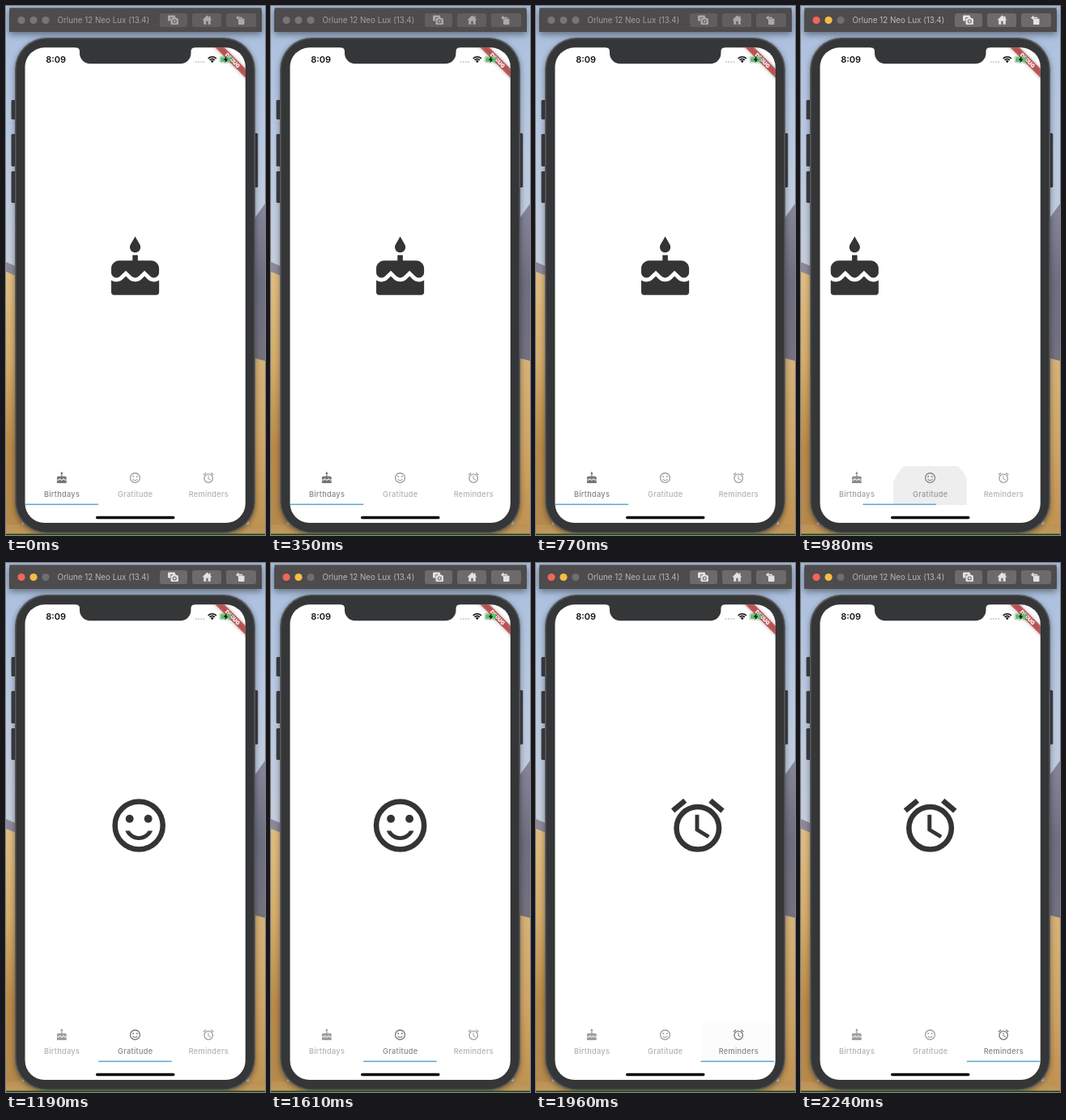
Recreate the animation shown at these times as an HTML page with a canvas. Size 320 by 653 pixels, loop 2.52 s.

```html
<!DOCTYPE html>
<html lang="en">
<head>
<meta charset="utf-8">
<title>Tab bar demo</title>
<style>
  html, body { margin: 0; width: 100%; height: 100%; overflow: hidden; background: #b9c6da; }
  canvas { display: block; width: 320px; height: 653px; }
</style>
</head>
<body>
<canvas id="stage"></canvas>
<script>
const W = 320, H = 653, LOOP = 2520, STEP = 70;
const PAGE = 272, TAB = PAGE / 3, LEFT = 23.5;
const PAGE_MS = 344, BAR_MS = 225;
const ACTIVE_AT = 840;
const TAPS = [{ at: 904, tab: 1 }, { at: 1769, tab: 2 }];
const LABELS = ['Birthdays', 'Gratitude', 'Reminders'];
const SANS = 'Inter, "Liberation Sans", sans-serif';

const canvas = document.getElementById('stage');
const ctx = canvas.getContext('2d');
const dpr = window.devicePixelRatio || 1;
canvas.width = W * dpr;
canvas.height = H * dpr;

// Icons live in a 24 x 24 box.
const cake = new Path2D('M12 6c1.11 0 2-.9 2-2 0-.38-.1-.73-.29-1.03L12 0l-1.71 2.97c-.19.3-.29.65-.29 1.03 0 1.1.9 2 2 2z' +
  'm4.6 9.99l-1.07-1.07-1.08 1.07c-1.3 1.3-3.58 1.31-4.89 0l-1.07-1.07-1.09 1.07C6.75 16.64 5.88 17 4.96 17c-.73 0-1.4-.23-1.96-.61V21' +
  'c0 .55.45 1 1 1h16c.55 0 1-.45 1-1v-4.61c-.56.38-1.23.61-1.96.61-.92 0-1.79-.36-2.44-1.01z');
cake.addPath(new Path2D('M18 9h-5V7h-2v2H6c-1.66 0-3 1.34-3 3v1.54c0 1.08.88 1.96 1.96 1.96.52 0 1.02-.2 1.38-.57l2.14-2.13 2.13 2.13' +
  'c.74.74 2.03.74 2.77 0l2.14-2.13 2.13 2.13c.37.37.86.57 1.38.57 1.08 0 1.96-.88 1.96-1.96V12c.01-1.66-1.33-3-2.99-3z'));
const mouth = new Path2D('M12 16c-1.48 0-2.75-.81-3.45-2H6.88c.8 2.05 2.79 3.5 5.12 3.5s4.32-1.45 5.12-3.5h-1.67c-.7 1.19-1.97 2-3.45 2z');
const bells = new Path2D('M22 5.72l-4.6-3.86-1.29 1.53 4.6 3.86zM7.88 3.39L6.6 1.86 2 5.71l1.29 1.53z' +
  'M12.5 8H11v6l4.75 2.85.75-1.23-4-2.37z');

const clamp = v => Math.max(0, Math.min(1, v));
const bez = (u, a, b) => 3 * u * (1 - u) * (1 - u) * a + 3 * u * u * (1 - u) * b + u * u * u;

// cubic-bezier(.25, .1, .25, 1)
function ease(x) {
  if (x <= 0 || x >= 1) return clamp(x);
  let lo = 0, hi = 1;
  for (let i = 0; i < 24; i++) {
    const mid = (lo + hi) / 2;
    if (bez(mid, .25, .25) < x) lo = mid; else hi = mid;
  }
  return bez(lo, .1, 1);
}

const progress = (t, ms) => TAPS.reduce((sum, tap) => sum + ease((t - tap.at) / ms), 0);

function disc(x, y, r, color) {
  ctx.fillStyle = color;
  ctx.beginPath();
  ctx.arc(x, y, r, 0, 7);
  ctx.fill();
}

function box(x, y, w, h, r, color) {
  ctx.fillStyle = color;
  ctx.beginPath();
  ctx.roundRect(x, y, w, h, r);
  ctx.fill();
}

function poly(points, color) {
  ctx.fillStyle = color;
  ctx.beginPath();
  points.forEach(p => ctx.lineTo(p[0], p[1]));
  ctx.fill();
}

function text(str, x, y, font, color, align = 'left', spacing = 0) {
  ctx.font = font + ' ' + SANS;
  ctx.fillStyle = color;
  ctx.textAlign = align;
  ctx.letterSpacing = spacing + 'px';
  ctx.fillText(str, x, y);
  ctx.letterSpacing = '0px';
}

function fade(y0, y1, ...colors) {
  const g = ctx.createLinearGradient(0, y0, 0, y1);
  colors.forEach((c, i) => g.addColorStop(i / (colors.length - 1), c));
  return g;
}

function shadow(color, blur, dy = 0) {
  ctx.shadowColor = color;
  ctx.shadowBlur = blur * dpr;
  ctx.shadowOffsetY = dy * dpr;
}

function ring(x, y, r, color) {
  ctx.strokeStyle = color;
  ctx.lineWidth = 2;
  ctx.beginPath();
  ctx.arc(x, y, r, 0, 7);
  ctx.stroke();
}

function icon(kind, x, y, size, color) {
  ctx.save();
  ctx.translate(x - size / 2, y - size / 2);
  ctx.scale(size / 24, size / 24);
  ctx.fillStyle = color;
  if (kind === 0) ctx.fill(cake);
  if (kind === 1) {
    ctx.fill(mouth);
    disc(8.5, 9.5, 1.5, color);
    disc(15.5, 9.5, 1.5, color);
    ring(12, 12, 9, color);
  }
  if (kind === 2) {
    ctx.fill(bells);
    ring(12, 13, 8, color);
  }
  ctx.restore();
}

function backdrop() {
  ctx.fillStyle = fade(0, 330, '#a9bfdf', '#b9c9e1', '#c6cedc');
  ctx.fillRect(0, 0, W, H);
  poly([[0, 316], [14, 322], [14, 345], [0, 345]], '#8b8a99');
  poly([[0, 328], [20, 336], [20, H], [0, H]], fade(328, H, '#e0bd83', '#d5ad6b', '#b98a48', '#b5884d'));
  poly([[W, 244], [300, 272], [300, 450], [W, 450]], fade(244, 440, '#85869a', '#6d6e80', '#74717f'));
  poly([[300, 433], [W, 438], [W, H], [300, H]], fade(433, H, '#d6b278', '#cfa566', '#c0914f'));
  ctx.fillStyle = fade(628, H, '#b5884d', '#c29a5e');
  ctx.fillRect(0, 640, W, 13);
}

function titleBar(active) {
  shadow('rgba(0,0,0,.45)', 9, 3);
  box(4, 2, 312, 30, [4, 4, 0, 0], '#4d4b4c');
  shadow('transparent', 0);
  box(4, 2, 312, 1, 0, '#6b6a6c');

  const lights = active ? ['#f3655b', '#f5bd45', '#706e6f'] : Array(3).fill('#777576');
  lights.forEach((c, i) => disc(19 + i * 15, 17.5, 4.6, c));
  text('Orlune 12 Neo Lux (13.4)', 63.5, 21, '400 9.8px', active ? '#b9b7b8' : '#a19fa0');

  const face = active ? '#6c6a6b' : '#605e5f', ink = active ? '#e3e1e2' : '#aaa8a9';
  [[190, 34], [230, 36], [272, 37]].forEach(([x, w]) => box(x, 9, w, 17, 3, face));

  box(200, 11.5, 9, 7, 1, ink);
  box(203, 14, 10.5, 9, 1.5, face);
  box(203.5, 15, 9.5, 8, 1.5, ink);
  box(206, 13.8, 4, 2, .5, ink);
  disc(208.3, 19, 2.5, face);
  disc(208.3, 19, 1.4, ink);

  poly([[248.5, 11.5], [254.5, 17.3], [242.5, 17.3]], ink);
  box(244.2, 16.5, 8.6, 6.2, 0, ink);
  box(251, 12.5, 1.6, 3, 0, ink);
  box(247.3, 18.7, 2.4, 4, 0, face);

  box(287, 15.5, 7.5, 7.5, 1, ink);
  poly([[284, 14.5], [287.5, 11.5], [287.5, 17.5]], ink);
  box(287, 13.7, 5, 1.4, 0, ink);
}

function phone() {
  [[116, 24], [158, 40], [204, 39]].forEach(([y, h]) => box(6.5, y, 7, h, 1.5, '#3d3e43'));
  box(304, 157, 7.3, 67, 1.5, '#3d3e43');
  shadow('rgba(0,0,0,.4)', 7, 2);
  box(11, 39, 297, 612, 39, '#5a5b5d');
  shadow('transparent', 0);
  box(12.5, 40.5, 294, 609, 38, '#353637');
}

function screenPath() {
  ctx.beginPath();
  ctx.roundRect(LEFT, 51.3, 272.3, 586.8, 24);
}

function ripple(t) {
  for (const { at, tab } of TAPS) {
    const age = t - at;
    if (age < -60 || age > 220) continue;
    const alpha = .065 * clamp((age + 60) / 50) * clamp((220 - age) / 144);
    ctx.save();
    ctx.beginPath();
    ctx.rect(LEFT + tab * TAB, 568, TAB, 48);
    ctx.clip();
    disc(LEFT + (tab + .5) * TAB + 1, 604, 49 * (age + 66) / 142, `rgba(0,0,0,${alpha})`);
    ctx.restore();
  }
}

function tabs(t) {
  const p = progress(t, BAR_MS);
  ripple(t);
  LABELS.forEach((label, i) => {
    const on = clamp(1 - Math.abs(p - i));
    const x = LEFT + (i + .5) * TAB;
    const iconTone = 158 - 40 * on, tone = 177 - 45 * on;
    icon(i, x, 582.4, 15.8, `rgb(${iconTone},${iconTone},${iconTone})`);
    text(label, x + .2, 605.5, '500 9.2px', `rgb(${tone},${tone},${tone})`, 'center', .28);
  });
  box(LEFT + p * TAB, 614.6, TAB, 1.4, 0, '#62a9cd');
}

function banner() {
  ctx.save();
  ctx.translate(295.8, 51.3);
  ctx.rotate(Math.PI / 4);
  shadow('rgba(0,0,0,.5)', 4);
  box(-40, 18.4, 80, 7.9, 0, 'rgba(183,28,28,.63)');
  shadow('transparent', 0);
  text('DEBUG', 0, 24.8, '900 6.6px', '#fff', 'center');
  ctx.restore();
}

function statusBar() {
  text('8:09', 49.3, 70, '600 11px', '#111');
  for (let i = 0; i < 4; i++) disc(234.8 + i * 3.2, 69, 1, '#c4c4c4');

  ctx.strokeStyle = '#111';
  ctx.lineWidth = 1.6;
  for (const r of [4.6, 7.2]) {
    ctx.beginPath();
    ctx.arc(254.8, 70, r, -Math.PI * .75, -Math.PI * .25);
    ctx.stroke();
  }
  poly([[254.8, 70.2], [252.7, 67.8], [254.8, 66.9], [256.9, 67.8]], '#111');

  ctx.strokeStyle = 'rgba(0,0,0,.35)';
  ctx.lineWidth = .7;
  ctx.beginPath();
  ctx.roundRect(263.8, 62.2, 15.4, 7.8, 2.2);
  ctx.stroke();
  box(265, 63.3, 13, 5.6, 1.2, '#58c46a');
  box(279.9, 64.8, 1, 2.6, .5, 'rgba(0,0,0,.35)');
  poly([[272.8, 61.8], [268.8, 66.8], [271.2, 66.8], [270.4, 70.4], [274.4, 65.4], [272, 65.4]], '#111');
}

function notch() {
  ctx.fillStyle = '#353637';
  ctx.beginPath();
  ctx.moveTo(86, 50);
  ctx.lineTo(86, 51.3);
  ctx.quadraticCurveTo(91, 51.3, 91, 56);
  ctx.arcTo(91, 71.2, 106, 71.2, 13);
  ctx.arcTo(228.5, 71.2, 228.5, 56, 13);
  ctx.lineTo(228.5, 56);
  ctx.quadraticCurveTo(228.5, 51.3, 233.5, 51.3);
  ctx.lineTo(233.5, 50);
  ctx.fill();
}

function screen(t) {
  screenPath();
  ctx.fillStyle = '#fff';
  ctx.fill();
  ctx.save();
  screenPath();
  ctx.clip();
  const p = progress(t, PAGE_MS);
  for (let i = 0; i < 3; i++) icon(i, 159.6 + (i - p) * PAGE, 324, 78.8, '#343435');
  tabs(t);
  banner();
  statusBar();
  box(111, 629.8, 97.5, 3.4, 1.7, '#050505');
  ctx.restore();
  notch();
}

function draw(t) {
  ctx.setTransform(dpr, 0, 0, dpr, 0, 0);
  backdrop();
  phone();
  titleBar(t >= ACTIVE_AT);
  screen(t);
  box(0, 651.5, W, 1.5, 0, '#1c4a12');
}

const start = performance.now();
function tick() {
  const t = (performance.now() - start) % LOOP;
  draw(Math.floor(t / STEP) * STEP);
  requestAnimationFrame(tick);
}
tick();
</script>
</body>
</html>
```
